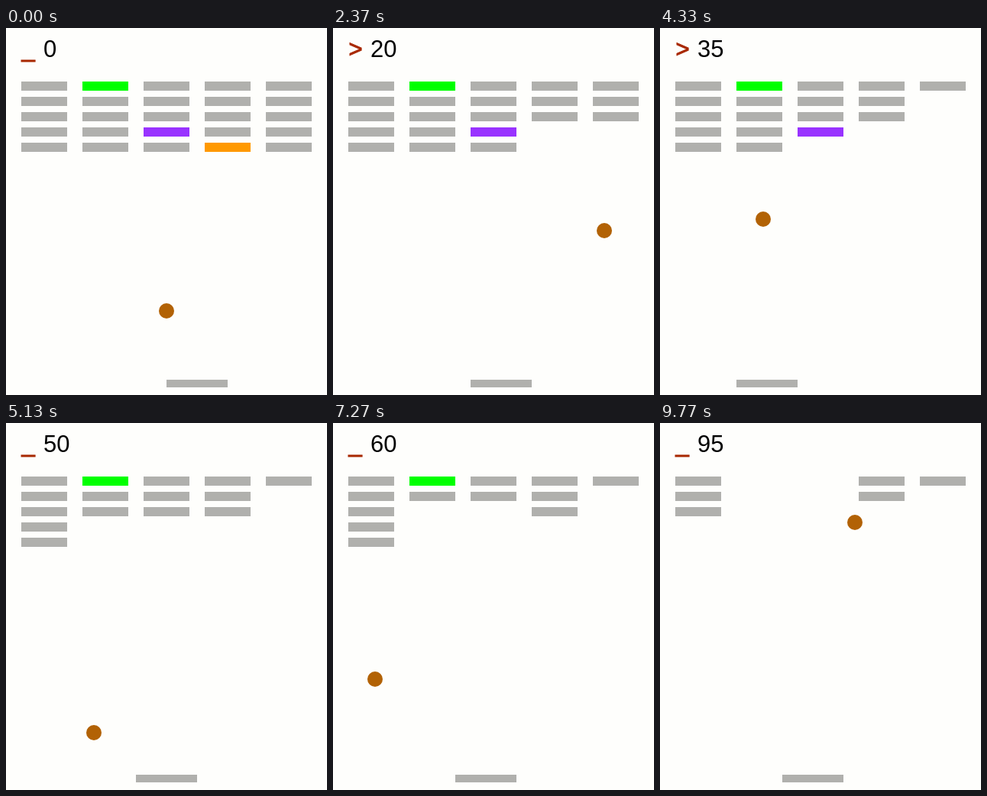
Write an HTML page with a canvas that moves like this. It is 420 by 480 pixels and loops after 9.81 s.

```html
<!DOCTYPE html>
<html lang="en">
<head>
<meta charset="utf-8">
<title>Brick game</title>
<style>
  html, body { margin: 0; width: 100%; height: 100%; overflow: hidden; background: #fefefc; }
  canvas { display: block; }
</style>
</head>
<body>
<canvas id="stage" width="420" height="480"></canvas>
<script>
const ctx = document.getElementById('stage').getContext('2d');
const LOOP = 9810, LAST = 293;
const PAPER = '#fefefc', GREY = '#b0b0ad';
const SPECIAL = { '10': '#00ff00', '23': '#9933ff', '34': '#ff9900' };
const LEFT = 10, RIGHT = 410, FLOOR = 450;

// Distance the ball has covered per axis over time
const pace = [[0, 0], [1230, 365], [3530, 1055], [5130, 1829], [6330, 2345], [8230, 2915], [9770, 3660]];

// Left edge of the paddle over time
const paddle = [
  [0, 210], [1000, 30], [1230, 30], [1747, 130], [3530, 260], [3900, 60],
  [5130, 170], [6330, 190], [6880, 150], [8230, 190], [9770, 160]
];

// Hits by distance covered: axis that flips, bricks (column, row) that break
const hits = {
  220: ['y', '44', '43'], 240: ['x', '34', '33'],
  838: ['x', '42', '24'], 880: ['y', '41'],
  1240: ['x'], 1520: ['x', '23'], 1557: ['y', '14', '13'],
  2187: ['x', '22'], 2192: ['y', '12'],
  2847: ['x', '21'], 2865: ['y', '11'],
  3498: ['', '04', '03'], 3578: ['', '10', '20'], 3600: ['y'], 3655: ['', '32']
};

const frameTime = n => Math.round(n * 10 / 3) * 10;
const snap = (v, step) => Math.round(v / step) * step;

function valueAt(keys, t) {
  let i = 1;
  while (i < keys.length - 1 && t > keys[i][0]) i++;
  const [t0, a] = keys[i - 1], [t1, b] = keys[i];
  return a + (b - a) * Math.min(1, (t - t0) / (t1 - t0));
}

// The ball travels diagonally; the paddle sends it back the way it came
function play(distance) {
  let x = 210, y = 370, dx = 1, dy = -1;
  const gone = new Set();
  for (let d = 1; d <= distance; d++) {
    x += dx;
    y += dy;
    if (x <= LEFT || x >= RIGHT) dx = x <= LEFT ? 1 : -1;
    if (y >= FLOOR) {
      dx = -dx;
      dy = -1;
    }
    const [axis, ...bricks] = hits[d] || [];
    if (axis === 'x') dx = -dx;
    if (axis === 'y') dy = -dy;
    bricks.forEach(id => gone.add(id));
  }
  return { x, y, gone };
}

function rect(color, x, y, w, h) {
  ctx.fillStyle = color;
  ctx.fillRect(x, y, w, h);
}

function drawHeader(prompt, score) {
  ctx.font = '31px "Liberation Sans", Arial, sans-serif';
  ctx.fillStyle = ctx.strokeStyle = '#a82800';
  ctx.fillText(prompt, 20.5, 38);
  ctx.strokeText(prompt, 20.5, 38);
  ctx.fillStyle = '#000';
  ctx.fillText(score, 49, 38);
}

function draw(t) {
  const { x, y, gone } = play(Math.round(valueAt(pace, t)));
  rect(PAPER, 0, 0, 420, 480);

  const powered = gone.has('34') && !gone.has('23');
  drawHeader(powered ? '>' : '_', String(gone.size * 5));

  for (let c = 0; c < 5; c++) {
    for (let r = 0; r < 5; r++) {
      const id = `${c}${r}`;
      if (!gone.has(id)) rect(SPECIAL[id] || GREY, 20 + c * 80, 70 + r * 20, 60, 12);
    }
  }

  rect(GREY, snap(valueAt(paddle, t), 10), 460, 80, 10);

  ctx.fillStyle = '#b26205';
  ctx.beginPath();
  ctx.arc(snap(x, 5), snap(y, 5), 10, 0, Math.PI * 2);
  ctx.fill();
}

const start = performance.now();
function tick() {
  const t = (performance.now() - start) % LOOP;
  let n = Math.min(LAST, Math.floor(t * 0.03) + 1);
  while (n > 0 && frameTime(n) > t) n--;
  draw(frameTime(n));
  requestAnimationFrame(tick);
}
tick();
</script>
</body>
</html>
```
